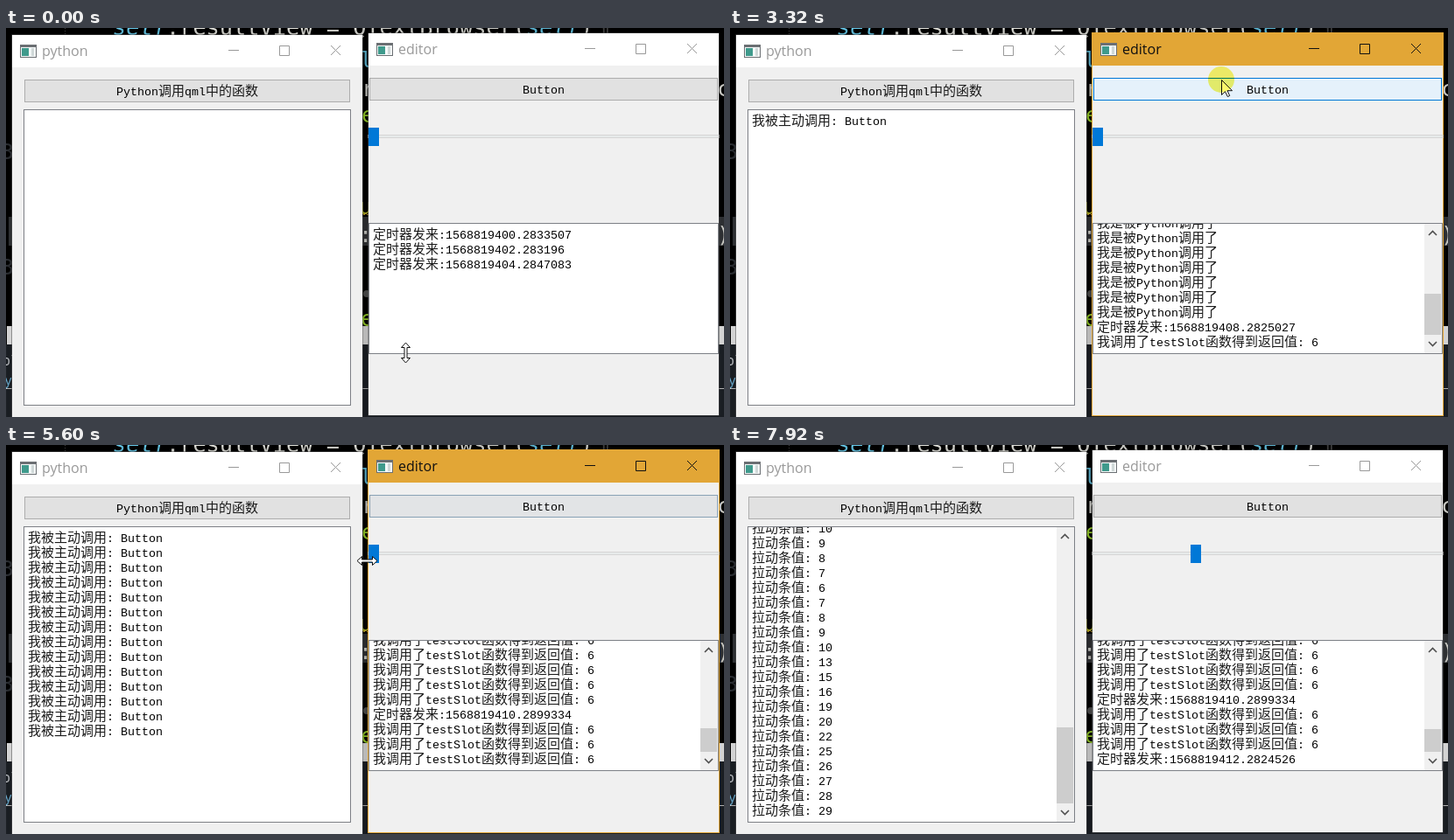
An HTML page that plays this animation: 820 by 445 pixels, repeating every 8.08 s.

```html
<!DOCTYPE html>
<html lang="zh">
<head>
<meta charset="utf-8">
<title>python and editor windows</title>
<style>
html, body { margin: 0; width: 100%; height: 100%; overflow: hidden; background: #000; }
svg { display: block; }
text { white-space: pre; }
.mono { font: 13.33px "Liberation Mono", "DejaVu Sans Mono", monospace; }
.cjk { font: 300 15px "Noto Sans CJK SC", "Noto Sans CJK", sans-serif; fill: #1c1c1c; }
.title { font: 16px "Open Sans", "Noto Sans", sans-serif; }
.code { font: 25.3px "DejaVu Sans Mono", monospace; }
</style>
</head>
<body>
<svg id="stage" width="820" height="445" viewBox="0 0 820 445"></svg>
<script>
const LOOP = 8080, ROW = 17, ACCENT = '#e2a636';
const stage = document.getElementById('stage');

function add(parent, tag, attrs, html) {
  const el = document.createElementNS('http://www.w3.org/2000/svg', tag);
  set(el, attrs);
  if (html) el.innerHTML = html;
  parent.appendChild(el);
  return el;
}
function set(el, attrs) {
  for (const k in attrs) el.setAttribute(k, attrs[k]);
}
const rect = (p, x, y, width, height, fill, more) =>
  add(p, 'rect', { x, y, width, height, fill, ...more });
const frame = (p, x, y, w, h, fill, stroke) =>
  rect(p, x + .5, y + .5, w - 1, h - 1, fill, { stroke });
const rich = s => s.replace(/[\u4e00-\u9fff]+/g, m => `<tspan class="cjk">${m}</tspan>`);
const clamp = v => Math.max(0, Math.min(1, v));
const mix = (a, b, k) => `rgb(${a.map((v, i) => Math.round(v + (b[i] - v) * k))})`;

// Code editor behind the windows
function drawBackdrop() {
  const code = (x, y, s, fill, more) =>
    add(stage, 'text', { x, y, fill, class: 'code', ...more }, s);
  const blue = '#66c8e8', white = '#e0e0da', green = '#a6e22e', dim = '#2e3136';
  rect(stage, 0, 0, 820, 445, '#000');
  rect(stage, 3, 216, 817, 33, '#333539');
  rect(stage, 1, 341, 819, 21, '#f0f0f0');
  rect(stage, 0, 362, 820, 83, '#1d2127');
  rect(stage, 0, 412, 820, 1, '#c8c8c8');
  add(stage, 'path', { d: 'M67.5 0V8', stroke: '#444', 'stroke-dasharray': '1 2' });
  const self = `<tspan fill="${blue}" font-style="italic">self</tspan>`;
  code(122, 8, `${self}.resultView = QTextBrowser(${self})`, white);
  code(675, 8, '¶', '#444');
  code(404, 45, 'l', blue, { 'font-style': 'italic' });
  code(406, 78, 'r', white);
  code(406, 108, 'e', green);
  code(403, 213, 'u', '#c5c828');
  add(stage, 'path', { d: 'M407 212l2 2 2-2 2 2 2-2', fill: 'none', stroke: '#c9a02c' });
  code(403, 245, ':', white);
  add(stage, 'circle', { cx: 412, cy: 304, r: 4, fill: '#555' });
  code(405, 341, 'e', green);
  code(812, 78, 'c', white);
  code(812, 245, ')', white);
  code(-6, 150, '3', dim);
  code(-6, 282, '3', dim);
  const small = { style: 'font-size:15px' };
  code(-4, 386, 'ol', '#c8ccd0', small);
  code(-2, 409, 'y', '#6fb4d8', small);
}

function makeWindow(x, y, name) {
  const g = add(stage, 'g', { transform: `translate(${x} ${y})` });
  rect(g, -1, -1, 402, 439, 'none', { stroke: '#000', 'stroke-width': 10, opacity: .12 });
  const edge = rect(g, -1, -1, 402, 439, '#444');
  rect(g, 0, 0, 400, 437, '#f0f0f0');
  const bar = rect(g, 0, 0, 400, 37, '#fff');
  rect(g, 9, 11, 19, 15, '#6b6f73');
  rect(g, 10, 14, 17, 11, '#f4f8f8');
  rect(g, 11, 15, 8, 9, '#3f9a8c');
  rect(g, 22, 15, 3, 9, '#cfd8d8');
  const label = add(g, 'text', { x: 34, y: 24, class: 'title' }, name);
  const icons = add(g, 'path', {
    d: 'M247 17.5h12M305.5 12.5h11v11h-11zM364 12l11 11m0-11l-11 11',
    fill: 'none'
  });
  let last;
  return active => {
    if (active === last) return;
    last = active;
    set(edge, active
      ? { x: -1, y: -1, width: 402, height: 439, fill: ACCENT }
      : { x: -.5, y: -.5, width: 401, height: 438, fill: '#4a4a4a' });
    set(bar, { y: active ? -1 : 0, height: active ? 38 : 37, fill: active ? ACCENT : '#fff' });
    set(label, { fill: active ? '#111' : '#999' });
    set(icons, { stroke: active ? '#111' : '#999' });
  };
}

function makeButton(x, y, w, caption) {
  const box = frame(stage, x, y, w, 26);
  add(stage, 'text', { x: x + w / 2, y: y + 18, 'text-anchor': 'middle', class: 'mono' }, rich(caption));
  return (fill, stroke) => set(box, { fill, stroke });
}

// Text browser that always stays scrolled to its last line
function makeList(x, y, w, h) {
  frame(stage, x, y, w, h, '#fff', '#7d8086');
  const view = add(stage, 'svg', { x: x + 1, y: y + 1, width: w - 2, height: h - 2 });
  const vw = w - 2, vh = h - 2, left = vw - 20, track = vh - 42;
  const rows = add(view, 'g', { class: 'mono' });
  const bar = add(view, 'g', {});
  rect(bar, left, 0, 20, vh, '#f0f0f0');
  const thumb = rect(bar, left, 0, 19, 0, '#cdcdcd');
  add(bar, 'path', {
    d: `M${left + 5} 13l4.5-4.5 4.5 4.5M${left + 5} ${vh - 13}l4.5 4.5 4.5-4.5`,
    fill: 'none', stroke: '#505050', 'stroke-width': 1.6
  });
  let key;
  return lines => {
    const now = lines.join('|');
    if (now === key) return;
    key = now;
    const doc = 8 + ROW * lines.length, off = Math.max(0, doc - vh);
    rows.innerHTML = lines.map((s, i) => {
      const base = 17 + ROW * i - off;
      return base < -6 ? '' : `<text x="4" y="${base}">${rich(s)}</text>`;
    }).join('');
    const len = Math.floor(track * vh / doc);
    set(bar, { visibility: off ? 'visible' : 'hidden' });
    set(thumb, { y: vh - 21 - len, height: len });
  };
}

drawBackdrop();
const leftWindow = makeWindow(7, 8, 'python');
const rightWindow = makeWindow(414, 6, 'editor');
const leftButton = makeButton(21, 59, 372, 'Python调用qml中的函数');
const rightButton = makeButton(415, 57, 398, 'Button');
const leftList = makeList(20, 93, 374, 339);
const rightList = makeList(414, 223, 400, 150);
rect(stage, 414, 122.5, 400, 3, '#e7eaea', { stroke: '#d6d6d6' });
const knob = rect(stage, 414, 114, 12, 21, '#0078d7');

const resize = 'M0-11.5L5-6H1.5V6H5L0 11.5L-5 6H-1.5V-6H-5Z';
const arrow = 'M0 0V17L4 13.2L6.8 19L9.2 18L6.5 12.2H12Z';
const pointer = add(stage, 'path', { fill: '#fff', stroke: '#111' });
const halo = add(stage, 'circle', { r: 15, fill: '#fbf86c', style: 'mix-blend-mode:multiply' });

// Clicks come in two regular bursts
const burst = (first, step, count, start) => ({
  count: t => Math.max(0, Math.min(count, Math.floor((t - first) / step) + 1)),
  down: t => {
    if (t >= start && t < first + 20) return true;
    const k = Math.round((t - first) / step), d = t - first - k * step;
    return k > 0 && k < count && d >= -65 && d < 20;
  }
});
const callQml = burst(600, 153, 13, 480);
const callPy = burst(3304, 136, 14, 3120);

const stamps = [
  [0, '1568819400.2833507'], [0, '1568819402.283196'], [0, '1568819404.2847083'],
  [1500, '1568819406.2918606'], [3200, '1568819408.2825027'],
  [4800, '1568819410.2899334'], [6420, '1568819412.2824526']
];
const events = stamps.map(([t, s]) => [t, '定时器发来:' + s]);
for (let k = 0; k < 13; k++) events.push([600 + 153 * k, '我是被Python调用了']);
for (let k = 0; k < 14; k++) events.push([3304 + 136 * k, '我调用了testSlot函数得到返回值: 6']);
events.sort((a, b) => a[0] - b[0]);

// Slider values in the order they are reported while dragging
const values = [0, 1, 2, 3, 4, 5, 6, 7, 8, 9, 10, 12, 13, 14, 15, 17, 18, 19, 20, 21, 22, 23, 24,
  23, 22, 21, 20, 18, 16, 15, 14, 12, 11, 10, 9, 8, 7, 6, 7, 8, 9, 10, 13, 15, 16, 19, 20, 22,
  25, 26, 27, 28, 29];
const dragPos = t => 36.2 * clamp((t - 5740) / 1240) + 15.8 * clamp((t - 7010) / 260);
const dragStep = t => Math.floor(dragPos(t) + 1e-6);
const knobX = v => 414 + 3.87 * v;

const path = [[60, 456, 371], [270, 284, 74], [2480, 284, 74], [2700, 430, 46], [2940, 561, 59],
  [5140, 561, 59], [5600, 412, 132], [5700, 420, 120], [5740, 420, 120]];
const exit = [[7380, 533, 125], [7540, 442, 410]];

function along(points, t) {
  if (t <= points[0][0]) return points[0].slice(1);
  for (let i = 1; i < points.length; i++) {
    const [t0, x0, y0] = points[i - 1], [t1, x1, y1] = points[i];
    if (t <= t1) {
      const k = (t - t0) / (t1 - t0);
      return [x0 + (x1 - x0) * k, y0 + (y1 - y0) * k];
    }
  }
  return points[points.length - 1].slice(1);
}
function cursorAt(t) {
  if (t < 5740) return along(path, t);
  if (t >= 7380) return along(exit, t);
  const p = dragPos(t), i = Math.floor(p), next = values[Math.min(i + 1, 52)];
  const v = values[i] + (next - values[i]) * (p - i);
  return [knobX(v) + 6.5, 120 + 5 * clamp((t - 7010) / 270)];
}

const REST = [225, 225, 225], REST_EDGE = [173, 173, 173];
const HOVER = [229, 241, 251], HOVER_EDGE = [0, 120, 215];
function paintButton(paint, clicks, t, enter, leave, gone, sunk, sunkEdge) {
  if (t < enter || t >= gone) return paint(mix(REST, REST, 0), mix(REST_EDGE, REST_EDGE, 0));
  const n = clicks.count(t);
  if (t < leave && n > 0 && !clicks.down(t)) return paint(sunk, sunkEdge);
  const k = clamp((t - leave) / (gone - leave));
  paint(mix(HOVER, REST, k), mix(HOVER_EDGE, REST_EDGE, k));
}

function draw(t) {
  leftWindow(t >= 480 && t < 3120);
  rightWindow(t >= 3120 && t < 7920);
  paintButton(leftButton, callQml, t, 480, 2520, 2900, '#d2e2ee', '#3c7aa8');
  paintButton(rightButton, callPy, t, 2920, 5300, 5680, '#d0e4f6', '#0062ad');

  const step = dragStep(t);
  leftList([
    ...Array(callPy.count(t)).fill('我被主动调用: Button'),
    ...values.slice(1, step + 1).map(v => '拉动条值: ' + v)
  ]);
  rightList(events.filter(e => e[0] <= t).map(e => e[1]));

  // The knob repaints slightly after the value is reported
  const dragging = t >= 5700 && t < 7390;
  set(knob, {
    x: Math.round(knobX(values[dragStep(t - 35)])),
    fill: dragging ? '#cccccc' : '#0078d7'
  });

  const [x, y] = cursorAt(t).map(Math.round);
  const isArrow = (t >= 2700 && t < 5450) || t >= 7450;
  const turn = !isArrow && t >= 5450 ? ' rotate(90)' : '';
  set(pointer, {
    d: isArrow ? arrow : resize,
    transform: `translate(${x + .5} ${y + .5})${turn}`,
    visibility: t < 7600 ? 'visible' : 'hidden'
  });
  const down = callQml.down(t) || callPy.down(t) || dragging;
  set(halo, { cx: x, cy: y, visibility: down ? 'visible' : 'hidden' });
}

const begin = performance.now();
function tick() {
  draw((performance.now() - begin) % LOOP);
  requestAnimationFrame(tick);
}
tick();
</script>
</body>
</html>
```
